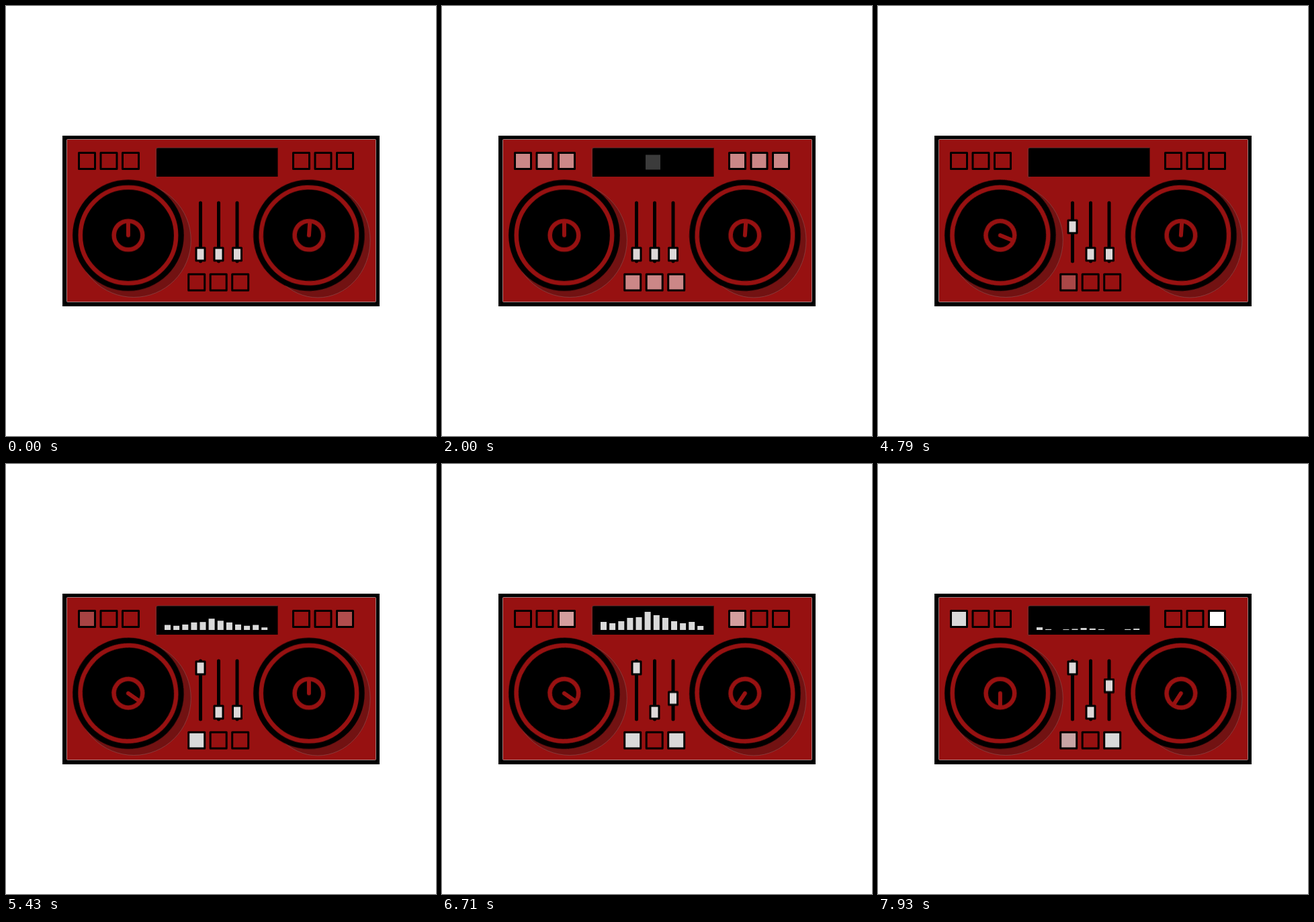
An HTML page without scripts that plays this animation: 640 px wide and 640 px high, repeating every 8000 ms.

```html
<!DOCTYPE html>
<html lang="en">
<head>
<meta charset="utf-8">
<title>DJ controller</title>
<style>
html, body { margin: 0; width: 100%; height: 100%; overflow: hidden; background: #fff; }
svg { display: block; width: 100vw; height: 100vh; }

.anim { animation: 8s linear infinite; }
.flash { animation-name: flash; fill: #fff; }
.badge { animation-name: badge; fill: #fff; }
.pair1 { animation-name: pair1; }
.pair2 { animation-name: pair2; }
.pair3 { animation-name: pair3; }
.cue1 { animation-name: cue1; }
.cue3 { animation-name: cue3; }
.fade1 { animation-name: fade1; }
.fade3 { animation-name: fade3; }
.spinL { animation-name: spinL; }
.spinR { animation-name: spinR; }
.bars use { animation: bar 8s linear infinite; }
.white { fill: #fff; }
.grey { fill: #d9d9d9; }

@keyframes flash {
  0%, 15.3% { opacity: 0; }
  19.6%, 20.5% { opacity: 1; }
  29.5%, 45.5% { opacity: 0; }
  49%, 50% { opacity: 1; }
  55.4%, 100% { opacity: 0; }
}
@keyframes badge {
  0%, 22% { opacity: 0; }
  34.9%, 45.5% { opacity: 1; }
  49%, 100% { opacity: 0; }
}
/* mirrored chase, outer pads to inner pads */
@keyframes pair1 {
  0%, 67% { opacity: 0; }
  70.5%, 71.3% { opacity: 1; }
  78.7%, 84% { opacity: 0; }
  86.3%, 86.9% { opacity: 1; }
  92.5%, 95.8% { opacity: 0; }
  98.2%, 100% { opacity: 1; }
}
@keyframes pair2 {
  0%, 73.1% { opacity: 0; }
  76.3%, 77% { opacity: 1; }
  83%, 87.5% { opacity: 0; }
  90.5%, 91% { opacity: 1; }
  95.2%, 100% { opacity: 0; }
}
@keyframes pair3 {
  0%, 78.7% { opacity: 0; }
  81.6%, 82.1% { opacity: 1; }
  86.5%, 91% { opacity: 0; }
  93.8%, 94.3% { opacity: 1; }
  98%, 100% { opacity: 0; }
}
@keyframes cue1 {
  0%, 58.2% { opacity: 0; }
  64.4%, 97.9% { opacity: 1; }
  100% { opacity: .55; }
}
@keyframes cue3 {
  0%, 78.7% { opacity: 0; }
  83.5%, 100% { opacity: 1; }
}
@keyframes fade1 {
  0% { transform: none; }
  54% { transform: translateY(0); animation-timing-function: ease-in-out; }
  64.3%, 100% { transform: translateY(-66px); }
}
@keyframes fade3 {
  0% { transform: none; }
  78.7% { transform: translateY(0); animation-timing-function: ease-in-out; }
  88.8%, 100% { transform: translateY(-39.5px); }
}
@keyframes spinL {
  0% { transform: rotate(0deg); }
  45.5% { transform: rotate(0deg); animation-timing-function: cubic-bezier(.3, .6, .5, 1); }
  68.7% { transform: rotate(125deg); }
  85% { transform: rotate(125deg); animation-timing-function: ease-in-out; }
  96.9%, 100% { transform: rotate(180deg); }
}
@keyframes spinR {
  0% { transform: rotate(4deg); }
  65% { transform: rotate(4deg); animation-timing-function: ease-in; }
  75% { transform: rotate(-30deg); animation-timing-function: ease-out; }
  84.4%, 100% { transform: rotate(-147deg); }
}
/* --a low hump, --b full spectrum, --c nearly silent */
@keyframes bar {
  0%, 64% { transform: scaleY(0); }
  69% { transform: scaleY(calc(var(--b) * .8)); }
  75% { transform: scaleY(var(--a)); }
  79% { transform: scaleY(calc(var(--b) * .6)); }
  83.9% { transform: scaleY(var(--b)); }
  89% { transform: scaleY(var(--a)); }
  94% { transform: scaleY(calc(var(--b) * .9)); }
  99.1% { transform: scaleY(var(--c)); }
  100% { transform: scaleY(calc(var(--c) * .3)); }
}
</style>
</head>
<body>
<svg viewBox="0 0 640 640">
  <defs>
    <rect id="pad" width="24" height="24"/>
    <g id="pads"><use href="#pad"/><use href="#pad" x="32.5"/><use href="#pad" x="65"/></g>
    <g id="allPads">
      <use href="#pads" x="108.5" y="218.5"/>
      <use href="#pads" x="427.5" y="218.5"/>
      <use href="#pads" x="271.7" y="399.3"/>
    </g>
    <g id="disc">
      <circle r="82.8"/>
      <g fill="none" stroke="#971111">
        <circle r="71.2" stroke-width="6.6"/>
        <circle r="21.3" stroke-width="6.6"/>
        <path d="M0 0V-20" stroke-width="6" stroke-linecap="round"/>
      </g>
    </g>
    <rect id="cap" x="-6.5" y="-9.5" width="13" height="19" fill="#ddd8d8" stroke="#000" stroke-width="3" stroke-linejoin="round"/>
    <rect id="bar" y="-1" width="9" height="1"/>
  </defs>

  <rect x="84" y="193" width="472" height="254"/>
  <rect x="90.5" y="198.5" width="460" height="242" rx="1" fill="#971111" stroke="#b9a0a0" stroke-width=".8"/>

  <g fill="#721212" stroke="#8a5555" stroke-width=".6">
    <circle cx="190.3" cy="348.5" r="85"/>
    <ellipse cx="464" cy="349" rx="78" ry="85"/>
  </g>

  <rect x="224" y="211" width="180.5" height="43"/>
  <path d="M404 211H226Q223 211 223 215V253Q223 256 227 255" fill="none" stroke="#6d3535" stroke-width=".9"/>

  <rect class="anim badge" x="303" y="221.5" width="22" height="22"/>
  <g class="bars grey" transform="translate(0 247)">
    <use href="#bar" x="236" style="--a:.6;--b:12;--c:4"/>
    <use href="#bar" x="249.1" style="--a:.8;--b:10;--c:1.2"/>
    <use href="#bar" x="262.3" style="--a:1.6;--b:13;--c:0"/>
    <use href="#bar" x="275.4" style="--a:4;--b:18;--c:1"/>
    <use href="#bar" x="288.5" style="--a:8;--b:19;--c:1.6"/>
    <use href="#bar" x="301.6" style="--a:16;--b:27;--c:3"/>
    <use href="#bar" x="314.8" style="--a:13;--b:22;--c:2.2"/>
    <use href="#bar" x="327.9" style="--a:7;--b:18;--c:1.2"/>
    <use href="#bar" x="341" style="--a:3;--b:13;--c:0"/>
    <use href="#bar" x="354.1" style="--a:1.4;--b:10;--c:0"/>
    <use href="#bar" x="367.2" style="--a:.8;--b:12;--c:1.2"/>
    <use href="#bar" x="380.2" style="--a:0;--b:6;--c:2"/>
  </g>

  <use class="anim flash" href="#allPads"/>
  <g class="anim pair1">
    <use class="grey" href="#pad" x="108.5" y="218.5"/>
    <use class="white" href="#pad" x="492.5" y="218.5"/>
  </g>
  <g class="anim pair2 white">
    <use href="#pad" x="141" y="218.5"/>
    <use href="#pad" x="460" y="218.5"/>
  </g>
  <g class="anim pair3 white">
    <use href="#pad" x="173.5" y="218.5"/>
    <use href="#pad" x="427.5" y="218.5"/>
  </g>
  <use class="anim cue1 grey" href="#pad" x="271.7" y="399.3"/>
  <use class="anim cue3 grey" href="#pad" x="336.7" y="399.3"/>
  <use href="#allPads" fill="none" stroke="#000" stroke-width="3" stroke-linejoin="round"/>

  <g transform="translate(181.9 341.3)"><use class="anim spinL" href="#disc"/></g>
  <g transform="translate(450.9 341.3)"><use class="anim spinR" href="#disc"/></g>

  <path d="M289.5 293V380M316.5 293V380M344 293V380" stroke="#000" stroke-width="5" stroke-linecap="round"/>
  <g class="anim fade1"><use href="#cap" x="289.5" y="369.5"/></g>
  <use href="#cap" x="316.5" y="369.5"/>
  <g class="anim fade3"><use href="#cap" x="344" y="369.5"/></g>
</svg>
</body>
</html>
```
